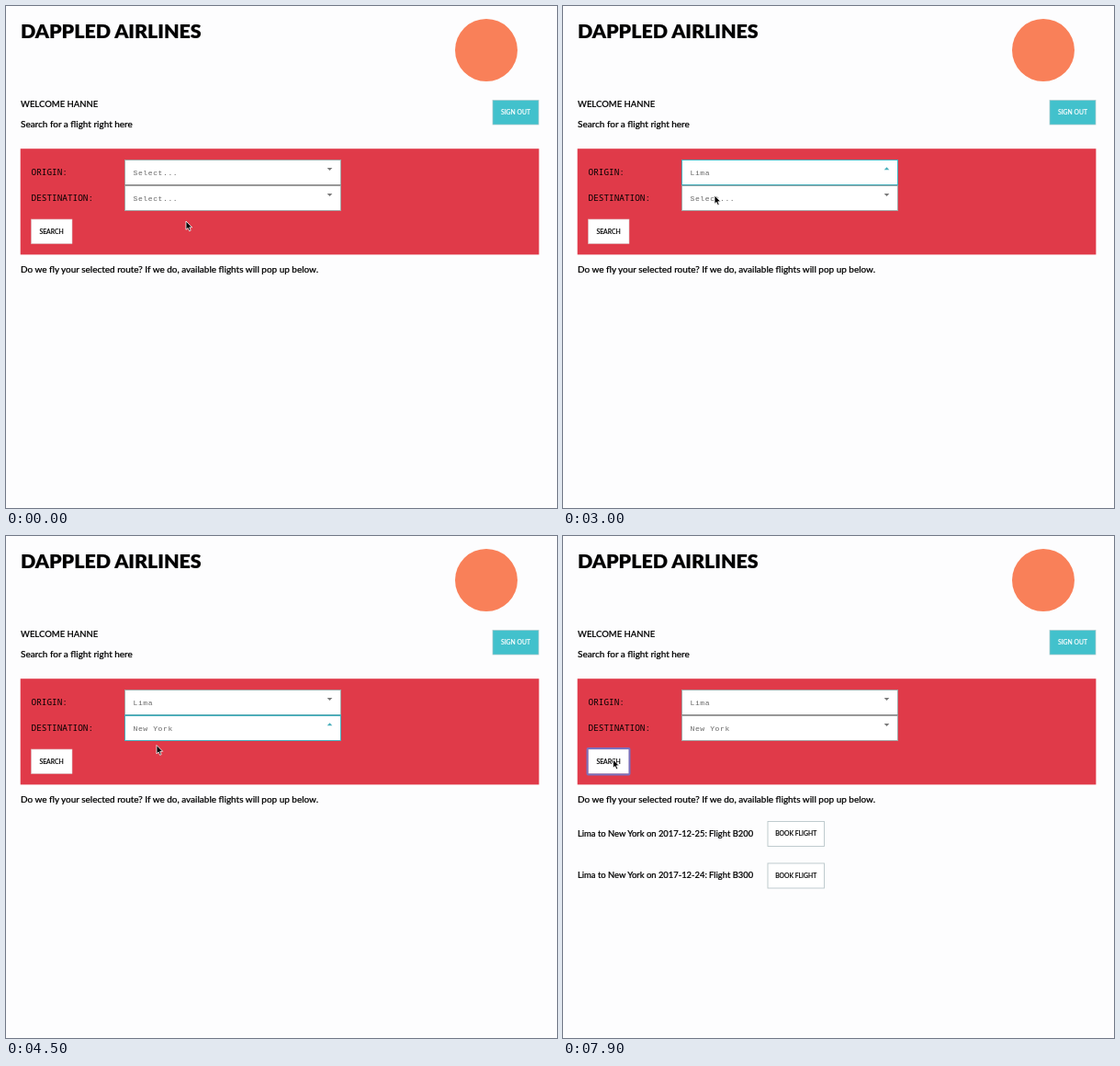
Write an HTML page that moves like this. It is 600 by 546 pixels and loops after 8000 ms.

```html
<!DOCTYPE html>
<html lang="en">
<head>
<meta charset="utf-8">
<title>Flight search</title>
<style>
  html, body { margin: 0; width: 100%; height: 100%; overflow: hidden; background: #fdfdfe; }
  svg { display: block; }
  text { font: 500 9.95px Lato, sans-serif; fill: #000; stroke: #000; stroke-width: .2px; white-space: pre; }
  .title { font-weight: 900; font-size: 21.4px; }
  .caps { font-size: 9.5px; }
  .flight { font-size: 9.4px; }
  .button { font-size: 6.8px; text-anchor: middle; stroke-width: .15px; }
  .light { fill: #fff; stroke: #fff; }
  .label { font: 9.4px "Noto Sans Mono", monospace; stroke: none; }
  .value { font: 8px "Liberation Mono", monospace; letter-spacing: .62px; fill: #666; stroke: none; }
  .item { font: 7.1px Inter, sans-serif; fill: #222; stroke: none; }
  .box { fill: #fff; stroke: #a3a3a3; }
  .arrow { fill: #777; }
  .focus .box { stroke: #47aebb; }
  .focus .arrow { fill: #47aebb; }
</style>
</head>
<body>
<svg width="600" height="546" viewBox="0 0 600 546">
  <defs>
    <linearGradient id="grey" x2="0" y2="1">
      <stop stop-color="#f1f0f1"/><stop offset="1" stop-color="#e9e8e9"/>
    </linearGradient>
    <linearGradient id="pink" x2="0" y2="1">
      <stop stop-color="#efdfe1"/><stop offset=".4" stop-color="#f1cbd0"/><stop offset="1" stop-color="#eed3d6"/>
    </linearGradient>
    <filter id="shadow" x="-10%" y="-20%" width="120%" height="160%">
      <feDropShadow dx="0" dy="3" stdDeviation="3" flood-opacity=".3"/>
    </filter>
  </defs>

  <text class="title" x="16" y="35">DAPPLED AIRLINES</text>
  <circle cx="523" cy="48" r="34" fill="#f98059"/>
  <text class="caps" x="16" y="109.5">WELCOME HANNE</text>
  <text x="16" y="131.5">Search for a flight right here</text>
  <rect x="530" y="102.5" width="50" height="26.5" fill="#42c1cc" stroke="#a5c9cc" stroke-width=".7"/>
  <text class="button light" x="555" y="118.2">SIGN OUT</text>

  <rect x="15.7" y="155.2" width="564.7" height="115.2" fill="#e03a49"/>
  <text class="label" x="27.5" y="184">ORIGIN:</text>
  <text class="label" x="27.5" y="212">DESTINATION:</text>
  <g id="selects"></g>
  <path id="divider" d="M129 194.7H365"/>

  <rect x="27.5" y="232" width="44.5" height="26.5" fill="#fff" stroke="#d9c4c6" stroke-width=".6"/>
  <rect id="ring" x="26.5" y="231" width="46" height="28.5" rx="1" fill="none" stroke="#7a70bd" stroke-width="2"/>
  <text class="button" x="49.6" y="247.6">SEARCH</text>
  <text x="16" y="290">Do we fly your selected route? If we do, available flights will pop up below.</text>

  <g id="results"></g>
  <g id="menu">
    <rect id="sheet" width="236" height="47" rx="3" filter="url(#shadow)"/>
    <rect id="highlight" width="236" height="10.5"/>
    <path id="check" d="M4.3 8.8l1.8 2.2 3.4-5.3" fill="none" stroke-width="1.1"/>
    <g id="items"></g>
  </g>
  <path id="cursor" d="M0 0V9.3L2.1 7.4 3.6 10.8 5.2 10.1 3.8 6.8H6.7Z" stroke="#fff" stroke-width=".8"/>
</svg>
<script>
const LOOP = 8000, STEP = 100, ROW = 10.5;
const $ = id => document.getElementById(id);

// Two drop-down boxes and their open, close and blur times
const fields = [
  { top: 167.5, city: "Lima", open: 800, close: 2000, blur: 3300, fill: "url(#grey)", mark: "#4299f3" },
  { top: 195.5, city: "New York", open: 3300, close: 4200, blur: 5900, fill: "url(#pink)", mark: "#1f80f0" },
];
$("selects").innerHTML = fields.map(f => `<g>
  <rect class="box" x="129.5" y="${f.top}" width="235" height="27"/>
  <text class="value" x="138.5" y="${f.top + 16.3}"></text>
  <path class="arrow"/></g>`).join("");

$("items").innerHTML = ["Select...", "Lima", "New York", "Sydney"].map((name, i) =>
  `<text class="item" x="14" y="${10.8 + i * ROW}">${name}</text>`).join("");

$("results").innerHTML = [["25", "200"], ["24", "300"]].map(([day, flight], i) => {
  const y = 310.5 + i * 45.5;
  return `<text class="flight" x="16" y="${y + 16}">Lima to New York on 2017-12-${day}: Flight B${flight}</text>
    <rect x="223" y="${y}" width="61.5" height="27" fill="#fff" stroke="#b9c6c9" stroke-width=".9"/>
    <text class="button" x="253.7" y="${y + 15.8}">BOOK FLIGHT</text>`;
}).join("");

// Pointer path: time, x, y
const path = [
  [0, 196, 234], [100, 182.5, 216.5], [200, 182.5, 216.5], [600, 166, 180],
  [1000, 166.5, 180], [1300, 167, 185.7], [1500, 164, 197], [1600, 164, 197],
  [1700, 164, 187], [2600, 164, 187], [3000, 165, 206], [3300, 165, 208],
  [3500, 165, 209], [4000, 164, 227.5], [4700, 164, 227.5], [5600, 54.5, 243], [LOOP, 54.5, 243],
];
function pointer(t) {
  const i = path.findIndex(p => p[0] > t);
  const [t0, x0, y0] = path[i - 1], [t1, x1, y1] = path[i];
  const k = (t - t0) / (t1 - t0), e = k * k * (3 - 2 * k);
  return [x0 + (x1 - x0) * e, y0 + (y1 - y0) * e];
}

const show = (id, on) => $(id).style.display = on ? "" : "none";

function drawMenu(field, t, y) {
  show("menu", field);
  if (!field) return;
  const top = field.top + 4.8;
  const row = Math.max(0, Math.min(3, Math.floor((y - top - 2) / ROW)));
  $("menu").setAttribute("transform", `translate(122 ${top})`);
  $("menu").style.opacity = t < field.close ? 1 : 1 - (t - field.close + STEP) / 300;
  $("sheet").setAttribute("fill", field.fill);
  $("highlight").setAttribute("fill", field.mark);
  $("highlight").setAttribute("y", 3 + row * ROW);
  $("check").setAttribute("stroke", row ? "#222" : "#fff");
  [...$("items").children].forEach((item, i) => item.style.fill = i === row ? "#fff" : "");
}

function draw(t) {
  const [x, y] = pointer(t);
  $("cursor").setAttribute("transform", `translate(${x} ${y})`);
  fields.forEach((f, i) => {
    const group = $("selects").children[i], focused = t >= f.close && t < f.blur;
    group.setAttribute("class", focused ? "focus" : "");
    group.children[1].textContent = t >= f.close ? f.city : "Select...";
    group.children[2].setAttribute("d", focused
      ? `M349.7 ${f.top + 10.8}h5.6l-2.8-3z` : `M349.7 ${f.top + 8.6}h5.6l-2.8 3z`);
  });
  $("divider").setAttribute("stroke", t >= fields[0].close && t < fields[1].blur ? "#47aebb" : "#8d8d8d");
  drawMenu(fields.find(f => t >= f.open && t < f.close + 200), t, y);
  show("ring", t >= 5900);
  show("results", t >= 7800);
}

function tick() {
  draw(Math.floor(performance.now() % LOOP / STEP) * STEP);
  requestAnimationFrame(tick);
}
tick();
</script>
</body>
</html>
```
